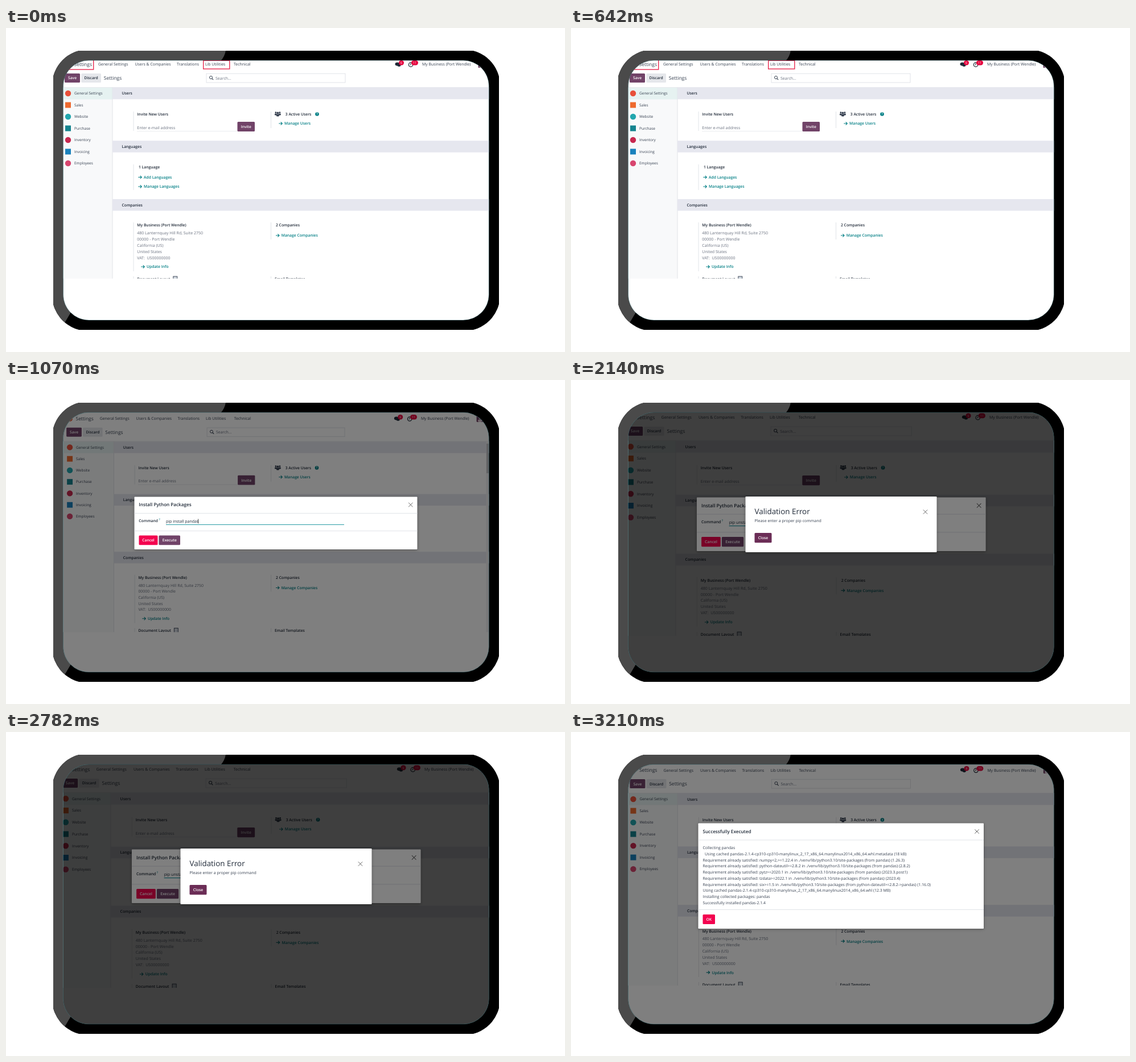
Animation of 982 by 570 pixels, one loop 4280 ms. Source, as an HTML page:

```html
<!DOCTYPE html>
<html lang="en">
<head>
<meta charset="utf-8">
<title>Package installer demo</title>
<style>
  html, body { margin: 0; width: 100%; height: 100%; overflow: hidden; background: #fff; }
  svg { display: block; }
  text { font-family: "Open Sans", "Noto Sans", sans-serif; white-space: pre; text-rendering: geometricPrecision; }
  .dialog { filter: drop-shadow(0 1.5px 2.5px rgba(0, 0, 0, .35)); }
</style>
</head>
<body>
<svg id="stage" width="982" height="570" viewBox="0 0 982 570"></svg>
<script>
const INK = '#374151', DARK = '#1f2937', GRAY = '#6b7280', TEAL = '#017e84';
const PLUM = '#714368', RED = '#f3044f', BAR = '#e6e7ef', LINE = '#dee1e6';

const box = (x, y, x2, y2, fill, r = 0, extra = '') =>
  `<rect x="${x}" y="${y}" width="${x2 - x}" height="${y2 - y}" rx="${r}" fill="${fill}" ${extra}/>`;
const dot = (x, y, r, fill) => `<circle cx="${x}" cy="${y}" r="${r}" fill="${fill}"/>`;
const path = (d, stroke, w = 1) => `<path d="${d}" fill="none" stroke="${stroke}" stroke-width="${w}"/>`;

// y is the vertical middle of the capitals
const text = (x, y, s, { size = 7, weight = 400, fill = INK, anchor = 'start' } = {}) =>
  `<text x="${x}" y="${y + size * .36}" font-size="${size}" font-weight="${weight}" fill="${fill}" text-anchor="${anchor}">` +
  s.replace(/&/g, '&amp;').replace(/</g, '&lt;') + '</text>';
const nav = (x, s) => text(x, 64, s, { size: 6.9, weight: 500 });
const strong = (x, y, s, fill = DARK) => text(x, y, s, { size: 6.75, weight: 600, fill });
const heading = (x, y, s, size = 8.15) => text(x, y, s, { size, weight: 600, fill: DARK });

const button = (x, y, x2, y2, s, fill = PLUM, color = '#fff') =>
  box(x, y, x2, y2, fill, 1.5) +
  text((x + x2) / 2, (y + y2) / 2, s, { size: 6.7, weight: 600, fill: color, anchor: 'middle' });
const link = (x, y, s) =>
  path(`M${x - 9.7} ${y}h6m-2.6 -2.6l2.6 2.6l-2.6 2.6`, TEAL, 1.1) + strong(x, y, s, TEAL);
const cross = (x, y, r = 3.7) =>
  path(`M${x - r} ${y - r}l${2 * r} ${2 * r}m0 ${-2 * r}l${-2 * r} ${2 * r}`, '#666', 1);
const section = (y, s) => box(187, y, 856, y + 20.5, BAR) + strong(203.5, y + 10.2, s);
const rule = (x, y, y2) => path(`M${x} ${y}V${y2}`, LINE, .9);
const person = (x, y, k) =>
  dot(x, y - 2 * k, 1.7 * k, INK) + box(x - 2.3 * k, y, x + 2.3 * k, y + 3.6 * k, INK, 1.4 * k);

const apps = [
  ['General Settings', 1, '#e8503a'], ['Sales', 0, '#ee6a2f'], ['Website', 1, '#22a6ae'],
  ['Purchase', 0, '#14848f'], ['Inventory', 1, '#c8284f'], ['Invoicing', 0, '#1a82bd'], ['Employees', 1, '#d8466f']
];
const address = ['480 Lanternquay Hill Rd, Suite 2750', '00000 - Port Wendle', 'California (US)',
  'United States', 'VAT:  US00000000'];
const firm = 'My Business (Port Wendle)';

const topBar =
  dot(109, 64, 5, '#e8603c') +
  text(119.5, 64, 'Settings', { size: 8.5, weight: 500 }) +
  nav(162, 'General Settings') + nav(226.5, 'Users & Companies') + nav(300, 'Translations') +
  nav(350, 'Lib Utilities') + nav(400, 'Technical') + nav(731, firm) +
  `<ellipse cx="687.5" cy="63.5" rx="4" ry="3" fill="${DARK}"/><ellipse cx="690.5" cy="65.5" rx="3" ry="2.3" fill="${DARK}"/>` +
  `<circle cx="711" cy="64.5" r="3.7" fill="none" stroke="${DARK}" stroke-width="1.2"/>` +
  path('M711 62v2.7h-1.6', DARK, .9) +
  box(690, 57, 699, 65.5, '#e6063f', 4.2) + box(712, 57, 724, 65.5, '#e6063f', 4.2) +
  text(694.5, 61.2, '6', { size: 5.2, fill: '#fff', anchor: 'middle' }) +
  text(718, 61.2, '11', { size: 5.2, fill: '#fff', anchor: 'middle' }) +
  box(829.5, 58, 841.5, 70, '#6b3a5e', 1.5) + dot(835.5, 62.5, 2.2, '#d9c3cf') +
  box(831.8, 65.5, 839.2, 70, '#d9c3cf', 2) +
  button(103, 80, 130, 96, 'Save') + button(132.3, 80, 167, 96, 'Discard', '#e5e7eb', DARK) +
  text(171.8, 88, 'Settings', { size: 8.5, weight: 500 }) +
  box(352, 80.2, 596, 96, '#fff', 0, `stroke="${LINE}" stroke-width=".9"`) +
  `<circle cx="360" cy="87" r="2.5" fill="none" stroke="${INK}" stroke-width="1"/>` +
  path('M361.8 88.8l2.4 2.4', INK, 1.2) + text(368, 88, 'Search...', { fill: GRAY });

const sidebar =
  box(90, 104.5, 187, 455, '#f8f9fa') + box(90, 105, 187, 125.5, '#e6f2f1') +
  path('M90 104.5H856', '#e3e5ea', .8) + rule(187, 104.5, 455) +
  apps.map(([name, round, color], i) => {
    const y = 115 + i * 20.5;
    return (round ? dot(109, y, 5.2, color) : box(104, y - 5, 114, y + 5, color)) +
      text(120, y, name, { size: 6.5, weight: 500 });
  }).join('');

const content =
  section(104.8, 'Users') + section(198.3, 'Languages') + section(301, 'Companies') +
  rule(224, 147, 181) + rule(465.5, 147, 176) + rule(224, 240, 285) + rule(224, 342, 428) +
  rule(465.5, 342, 372) + rule(224, 437, 455) + rule(465.5, 437, 455) +
  strong(230.3, 151.5, 'Invite New Users') + text(230.3, 175.2, 'Enter e-mail address', { fill: GRAY }) +
  path('M230 181.5H406', '#e5e7eb', .8) + button(406.5, 165, 437, 182, 'Invite') +
  person(473.9, 150.4, .85) + person(480.9, 150.4, .85) + person(477.4, 151.6, 1.1) +
  strong(490.8, 151.5, '3 Active Users') + dot(546.5, 151.5, 3.3, TEAL) +
  text(546.5, 151.6, '?', { size: 5.2, weight: 700, fill: '#fff', anchor: 'middle' }) +
  link(489, 168, 'Manage Users') +
  strong(233, 244.5, '1 Language') + link(242, 262.5, 'Add Languages') + link(242, 279, 'Manage Languages') +
  strong(230.3, 347, firm) +
  address.map((s, i) => text(230.3, 360.8 + i * 10.8, s, { fill: GRAY })).join('') +
  link(247, 420, 'Update Info') +
  strong(474, 347, '2 Companies') + link(483.7, 365, 'Manage Companies') +
  strong(230.3, 441.3, 'Document Layout') + strong(472, 441.3, 'Email Templates') +
  box(293.8, 437, 300.8, 445, '#cfd6de', 0, `stroke="${INK}" stroke-width=".9"`);

// the nested svg cuts the page off at its lower edge
const page = (matrix, bottom) =>
  `<svg width="982" height="${bottom}"><g transform="matrix(${matrix})">${sidebar + content + topBar}</g></svg>`;
const shade = box(90, 50, 860, 520, '#000', 0, 'opacity=".5"');
const dialog = (x, y, x2, y2, body) => `<g class="dialog">${box(x, y, x2, y2, '#fff', 1)}</g>${body}`;
const divider = (x, x2, y) => path(`M${x} ${y}H${x2}`, LINE, .9);

const installer = (command, caret) => dialog(225.5, 205.5, 722.5, 298,
  heading(233.3, 219.5, 'Install Python Packages') + cross(710.8, 219.5) +
  divider(225.5, 722.5, 234.5) + divider(225.5, 722.5, 265.5) +
  strong(233.3, 247.5, 'Command') + text(268.5, 245.3, '?', { size: 4.8, weight: 600, fill: TEAL }) +
  text(281, 248.4, command, { fill: DARK }) + (caret ? path('M337.6 244.5v8', '#111', .8) : '') +
  path('M281 254.5H594', '#2a9ba5', 1) +
  button(233.5, 273.5, 266.5, 290.3, 'Cancel', RED) + button(268.5, 273.5, 306, 290.3, 'Execute'));

const failure = dialog(306.5, 205, 642.5, 303,
  text(322.5, 231.5, 'Validation Error', { size: 13.4, weight: 500, fill: DARK }) + cross(622.5, 232) +
  text(322.5, 247.3, 'Please enter a proper pip command') +
  button(322.5, 269, 352.5, 286.3, 'Close', '#6b2d56'));

const needs = (pkg, version, from = 'pandas') =>
  `Requirement already satisfied: ${pkg} in ./venv/lib/python3.10/site-packages (from ${from}) (${version})`;
const wheel = 'Using cached pandas-2.1.4-cp310-cp310-manylinux_2_17_x86_64.manylinux2014_x86_64.whl';
const log = [
  'Collecting pandas', `  ${wheel}.metadata (18 kB)`,
  needs('numpy<2,>=1.22.4', '1.26.3'), needs('python-dateutil>=2.8.2', '2.8.2'),
  needs('pytz>=2020.1', '2023.3.post1'), needs('tzdata>=2022.1', '2023.4'),
  needs('six>=1.5', '1.16.0', 'python-dateutil>=2.8.2->pandas'),
  `${wheel} (12.3 MB)`, 'Installing collected packages: pandas', 'Successfully installed pandas-2.1.4'
];
const success = dialog(223.5, 160.5, 725, 346,
  heading(231.5, 175.2, 'Successfully Executed') + cross(713, 175) +
  divider(223.5, 725, 190) + divider(223.5, 725, 312.5) +
  log.map((s, i) => text(231.5, 203.6 + i * 10.75, s, { size: 6.9 })).join('') +
  button(231.5, 321, 253, 338, 'OK', RED));

const frameBox = (x, y, x2, y2) => box(x, y, x2, y2, 'none', 0, 'stroke="#e8284f" stroke-width="1.4"');
const scenes = [
  page('1 0 0 1 0 0', 440.7) + frameBox(95, 50, 153.7, 73) + frameBox(346.7, 57.3, 392.8, 72),
  page('.9917 0 0 .988 4 4.8', 443.5) + box(843.5, 108, 848, 443.5, '#f1f1f3') +
    box(844, 112, 848, 164, '#c4c6ca') + shade + installer('pip install pandas', true),
  page('1.0131 0 0 1.0121 -5.57 .93', 450) + shade +
    `<g transform="matrix(1.0215 0 0 1.0225 -9.4 -3.6)">${installer('pip unstall pandas')}</g>` + shade + failure,
  page('1 0 0 1 .4 3.1', 446) + shade + success
];

const stage = document.getElementById('stage');
stage.innerHTML = `
  <clipPath id="edge">${box(83, 40, 866, 531, '#000')}</clipPath>
  <clipPath id="body">${box(81, 38, 868, 533, '#000', 63)}</clipPath>
  <clipPath id="screen">${box(100.5, 57, 848.3, 514, '#000', 45)}</clipPath>
  <g clip-path="url(#edge)"><g clip-path="url(#body)">
    ${box(80, 36, 870, 540, '#000')}
    <path d="M0 0H386V40Q384 50 378 57L104 517L72 570H0Z" fill="#4a4a4a"/>
  </g></g>
  <g clip-path="url(#screen)">
    ${box(90, 50, 860, 520, '#fff')}
    ${scenes.map(s => `<g class="scene">${s}</g>`).join('')}
  </g>
  ${box(100.5, 57, 848.3, 514, 'none', 45, 'stroke="#1d5a60" stroke-width=".7" opacity=".6"')}`;

const layers = stage.querySelectorAll('.scene');
function draw() {
  const current = Math.floor(performance.now() % 4280 / 1070);
  layers.forEach((g, i) => g.style.display = i === current ? '' : 'none');
  requestAnimationFrame(draw);
}
draw();
</script>
</body>
</html>
```
